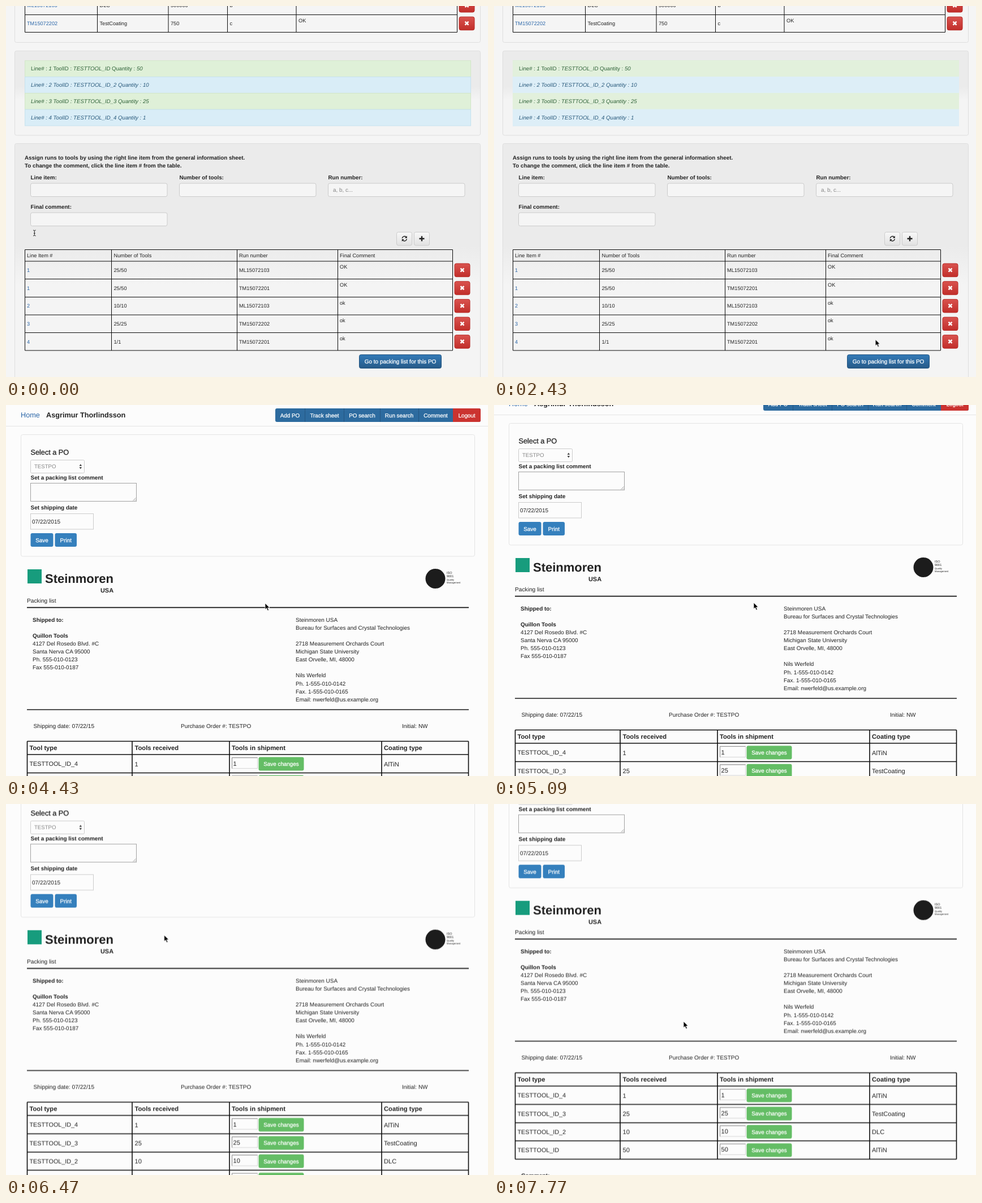
These frames come from a looping animation (852 by 657 pixels, 8 s). An HTML page:

```html
<!DOCTYPE html>
<html lang="en">
<head>
<meta charset="utf-8">
<title>Packing list</title>
<style>
html, body { margin: 0; height: 100%; overflow: hidden; background: #fcfcfc; }
svg { display: block; width: 100vw; height: 100vh; }
text { font-family: "Liberation Sans", Arial, sans-serif; fill: #222; white-space: pre; text-rendering: geometricPrecision; }
.b { font-weight: 700; }
.i { font-style: italic; }
.mid { text-anchor: middle; }
.heavy { stroke: #222; stroke-width: .3; }
.white { fill: #fff; stroke: #fff; stroke-width: .28; }
.link { fill: #2a66a8; }
.green { fill: #2f6238; }
.blue { fill: #27587a; }
.gray { fill: #858585; }

.show { animation: 8s step-end infinite; }
#beam { animation-name: beam; }
#arrow { animation-name: arrow; }
#hand, #hover { animation-name: hand; }
#press { animation-name: press; }
#pale { animation-name: pale; }
#runs { animation-name: runs; }
#packing { animation-name: packing; }
#scroll { animation: scroll 8s step-end infinite; }
#cursor { animation: move 8s linear infinite; }

@keyframes beam { 0% { opacity: 1 } .625%, 100% { opacity: 0 } }
@keyframes arrow { 0% { opacity: 0 } .625% { opacity: 1 } 33.6% { opacity: 0 } 47.5%, 100% { opacity: 1 } }
@keyframes hand { 0% { opacity: 0 } 33.6% { opacity: 1 } 47.5%, 100% { opacity: 0 } }
@keyframes press { 0% { opacity: 0 } 44.875%, 100% { opacity: 1 } }
@keyframes pale { 0% { opacity: 0 } 30.375%, 100% { opacity: 1 } }
@keyframes runs { 0% { opacity: 1 } 47.5%, 100% { opacity: 0 } }
@keyframes packing { 0% { opacity: 0 } 47.5%, 100% { opacity: 1 } }
@keyframes scroll {
  0% { transform: translateY(0) }
  59.125% { transform: translateY(-1px) }
  60.25% { transform: translateY(-3px) }
  61.375% { transform: translateY(-6px) }
  63.625% { transform: translateY(-20px) }
  65.125% { transform: translateY(-46px) }
  67.75% { transform: translateY(-67.5px) }
  86.875% { transform: translateY(-68.2px) }
  87.6% { transform: translateY(-69.2px) }
  88.25% { transform: translateY(-70.4px) }
  89% { transform: translateY(-73px) }
  91.625% { transform: translateY(-98px) }
  94.5%, 100% { transform: translateY(-119.5px) }
}
@keyframes move {
  0%, 2.6% { transform: translate(57px, 428px) }
  8% { transform: translate(190px, 500px) }
  13.25% { transform: translate(366px, 529px) }
  15.5% { transform: translate(452px, 544px) }
  18.75% { transform: translate(573px, 560px) }
  23.375% { transform: translate(668px, 578px) }
  25.625%, 29.7% { transform: translate(673px, 584px) }
  35.125%, 50.5% { transform: translate(682px, 636px) }
  51.9% { transform: translate(640px, 592px) }
  53.1% { transform: translate(585px, 552px) }
  54.4% { transform: translate(482px, 404px) }
  55.375%, 60% { transform: translate(458px, 351px) }
  62%, 70.7% { transform: translate(459px, 350px) }
  70.75%, 72.5% { transform: translate(456px, 348px) }
  81.625% { transform: translate(264px, 222px) }
  84.625% { transform: translate(257px, 211px) }
  91.625% { transform: translate(257px, 211px); animation-timing-function: step-end }
  94.5% { transform: translate(299px, 355px); animation-timing-function: step-end }
  97.125%, 100% { transform: translate(335px, 385px) }
}
</style>
</head>
<body>
<svg viewBox="0 0 852 657" preserveAspectRatio="none">
  <defs>
    <linearGradient id="well" x2="0" y2="1"><stop offset=".42" stop-color="#ebebeb"/><stop offset=".58" stop-color="#f4f4f4"/></linearGradient>
    <linearGradient id="red" x2="0" y2="1"><stop stop-color="#d9534f"/><stop offset="1" stop-color="#c12e2a"/></linearGradient>
    <linearGradient id="navy" x2="0" y2="1"><stop stop-color="#337ab7"/><stop offset="1" stop-color="#265a88"/></linearGradient>
    <linearGradient id="dim" x2="0" y2="1"><stop stop-color="#2d6a9f"/><stop offset=".55" stop-color="#265a88"/></linearGradient>
    <linearGradient id="plain" x2="0" y2="1"><stop stop-color="#f8f8f8"/><stop offset="1" stop-color="#e2e2e2"/></linearGradient>
  </defs>
  <g id="runs" class="show"></g>
  <g id="packing" class="show"><rect width="852" height="657" fill="#fcfcfc"/><g id="scroll"></g></g>
  <g id="beam" class="show"><path d="M48 397q2.3 0 2.3 1.5v7q0 1.5-2.3 1.5M52.600 397q-2.300 0-2.300 1.500M52.600 407q-2.300 0-2.300-1.500M49 402.500h2.600" fill="none" stroke="#222"/></g>
  <g id="cursor">
    <path id="arrow" class="show" d="M0 0v11.200l2.600-2.400 1.900 4.400 2-.9-1.900-4.200h3.500z" fill="#000" stroke="#fff" stroke-width=".8"/>
    <path id="hand" class="show" d="M-1 1.500q0-1.500 1.200-1.500t1.200 1.500v3q2-.8 2.400.6 1.700-.5 2 .8 1.700-.2 1.700 1.500v1.600q0 1.500-1.200 3.500h-6q-1-2-3.300-4.300-.9-1.600.6-1.700l1.400 1.200z" fill="#fff" stroke="#111" stroke-width=".9"/>
  </g>
</svg>
<script>
const SMALL = 9.2, BODY = 9.87, ADDRESS = 9.95, CELL = 11.1;

// Text is placed by the middle of its capitals.
const text = (x, y, s, size = BODY, cls = '') =>
  `<text x="${x}" y="${y + size * .36}" font-size="${size}" class="${cls}">${s}</text>`;
const box = (x, y, w, h, fill, stroke = 'none', r = 0) =>
  `<rect x="${x}" y="${y}" width="${w}" height="${h}" rx="${r}" fill="${fill}" stroke="${stroke}"/>`;
const path = (d, stroke = '#111', width = 1) =>
  `<path d="${d}" fill="none" stroke="${stroke}" stroke-width="${width}"/>`;
const grid = (xs, ys, width) => path(
  xs.map(x => `M${x} ${ys[0]}V${ys.at(-1)}`).join('') +
  ys.map(y => `M${xs[0]} ${y}H${xs.at(-1)}`).join(''), '#0c0c0c', width);
const button = (x, y, w, label, fill, stroke = 'none') =>
  box(x, y, w, 24, fill, stroke, 3) + text(x + w / 2, y + 12, label, BODY, 'white mid');
const remove = (x, y) => box(x + .5, y - 11.5, 27, 23.5, 'url(#red)', '#b92c28', 3) +
  path(`M${x + 11} ${y - 3}l6 6m0-6l-6 6`, '#fff', 2.5);
const lines = (x, rows) => rows.map(([y, s, cls]) => text(x, y, s, ADDRESS, cls)).join('');

function runsPage() {
  let out = box(0, 0, 852, 657, '#f5f5f5');

  out += box(15.5, -60, 823, 124.5, '#f5f5f5', '#dedede', 3);
  out += grid([33.5, 161.5, 287, 391.5, 513, 797.5], [-16, 15.5, 46.5], 1);
  [['ML15072103', 'DLC', '500000', 'b', ''], ['TM15072202', 'TestCoating', '750', 'c', 'OK']].forEach((row, r) => {
    const y = -1 + r * 31.7;
    row.forEach((s, c) => out += text([37, 165.5, 291, 395.5, 517][c], c == 4 ? y - 5.5 : y, s, SMALL, c ? '' : 'link'));
    out += remove(800.5, y);
  });

  out += box(15.5, 79.5, 823, 149.5, 'url(#well)', '#dedede', 3);
  const bands = (colors, borders) => [0, 1, 2, 3].map(n =>
    box(33.5, 96.800 + n * 28.8, 788, 28.8, colors[n % 2], borders[n % 2])).join('');
  out += bands(['#dff0d8', '#d9edf7'], ['#d2e6c8', '#c6e2ee']);
  out += `<g id="pale" class="show">${bands(['#e2f0dc', '#ddeef7'], ['#e2f0dc', '#ddeef7'])}</g>`;
  const it = s => `<tspan class="i">${s}</tspan>`;
  out += text(44, 111, `Line# : ${it(1)} ToolID : ${it('TESTTOOL_ID')} Quantity : ${it(50)}`, 9.65, 'green');
  [10, 25, 1].forEach((n, k) => out += text(44, 140 + k * 29,
    `Line# : ${k + 2} ToolID : TESTTOOL_ID_${k + 2} Quantity : ${n}`, 9.65, k == 1 ? 'i green' : 'i blue'));

  out += box(15.5, 243.5, 823, 432, 'url(#well)', '#dedede', 3);
  out += text(33, 268, 'Assign runs to tools by using the right line item from the general information sheet.', 9.8, 'b');
  out += text(33, 282, 'To change the comment, click the line item # from the table.', 9.8, 'b');
  [[43.5, 303, 'Line item:'], [306.5, 303, 'Number of tools:'], [569.5, 303, 'Run number:'], [43.5, 355, 'Final comment:']]
    .forEach(([x, y, s]) => out += text(x, y, s, 9.8, 'b') + box(x, y + 11, 241.5, 23.5, '#f5f5f5', '#cbcbcb', 3));
  out += text(578, 325.8, 'a, b, c...', BODY, 'gray');

  out += box(690.5, 400.5, 27, 23.5, 'url(#plain)', '#ccc', 3) + box(721.5, 400.5, 27, 23.5, 'url(#plain)', '#ccc', 3);
  out += path('M735 407.500v9m-4.500-4.500h9', '#222', 2.4);
  out += path('M700.300 411.500a4 4 0 0 1 6.800-2.500m1.200 3.500a4 4 0 0 1-6.800 2.500', '#222', 1.5);
  out += '<path d="M708.800 407v4h-4zM699.800 417v-4h4z" fill="#222"/>';

  const cols = [37, 190.5, 412, 590];
  out += grid([33.5, 186.5, 408.5, 586.5, 789.5], [431.5, 452, 483.5, 515.5, 547, 578.5, 610], 1);
  ['Line Item #', 'Number of Tools', 'Run number', 'Final Comment'].forEach((s, c) => out += text(cols[c], 441.3, s, SMALL));
  [[1, '25/50', 'ML15072103', 'OK'], [1, '25/50', 'TM15072201', 'OK'], [2, '10/10', 'ML15072103', 'ok'],
   [3, '25/25', 'TM15072202', 'ok'], [4, '1/1', 'TM15072201', 'ok']].forEach((row, r) => {
    const y = 467.6 + r * 31.65;
    row.forEach((s, c) => out += text(cols[c], c == 3 ? y - 5.5 : y, s, SMALL, c ? '' : 'link'));
    out += remove(792.5, y);
  });

  const go = fill => box(624.5, 617.5, 145, 24, fill, '#245580', 3);
  out += go('url(#navy)') + `<g id="hover" class="show">${go('url(#dim)')}</g><g id="press" class="show">${go('#27608f')}</g>`;
  return out + text(697, 629.7, 'Go to packing list for this PO', 10, 'white mid');
}

function packingPage() {
  let out = text(26, 17.5, 'Home', 12.7, 'link') + text(71, 17.5, 'Asgrimur Thorlindsson', 12.7, 'b');
  out += path('M0 37.500H852', '#e4e4e4');
  out += box(476, 6, 363, 24, '#2d6b9f', 'none', 3) + '<path d="M790 6h46q3 0 3 3v18q0 3-3 3h-46z" fill="#cb3330"/>';
  out += path('M528.500 6v24M597.500 6v24M661.500 6v24M729.500 6v24', '#245682');
  [[502, 'Add PO'], [563, 'Track sheet'], [629.5, 'PO search'], [695, 'Run search'], [759.5, 'Comment'], [814.5, 'Logout']]
    .forEach(([x, s]) => out += text(x, 18.3, s, BODY, 'white mid'));

  out += box(26.5, 52.5, 802, 215.5, '#fcfcfc', '#e4e4e4', 3);
  out += text(43.5, 83.5, 'Select a PO', 12.7, 'heavy');
  out += box(43.5, 97.5, 95, 23, '#fcfcfc', '#ccc', 2) + text(50, 109, 'TESTPO', 9.6, 'gray');
  out += '<path d="M129.500 108l2.300-3.500 2.300 3.500zM129.500 110l2.300 3.500 2.300-3.500z" fill="#444"/>';
  out += text(43.5, 128, 'Set a packing list comment', ADDRESS, 'b');
  out += box(43.5, 138.5, 187, 32, '#fcfcfc', '#a2a2a2') + path('M224.500 169.500l5-5m-2 5l2-2', '#888', .8);
  out += text(43.5, 181.5, 'Set shipping date', ADDRESS, 'b');
  out += box(43.5, 192.5, 111, 27.5, '#fcfcfc', '#ccc') + text(46, 206.2, '07/22/2015', 10);
  out += button(43.5, 227, 40, 'Save', '#3580bd') + button(86.5, 227, 38.5, 'Print', '#3580bd');

  out += box(38, 291, 25, 25, '#179c7d') + text(69, 307.3, 'Steinmoren', 22, 'b') + text(167, 328.2, 'USA', 10.9, 'b');
  out += '<circle cx="759" cy="307.500" r="17.500" fill="#1c1c1c"/>';
  [[297, 'ISO', 5.5], [303.3, '9001', 5.5], [309, 'Quality', 4.2], [314, 'Management', 4.2]]
    .forEach(([y, s, size]) => out += text(779, y, s, size));
  out += text(37, 346, 'Packing list', 10.2) + path('M37 358.600H818M37 539.500H818', '#111', 1.6);

  out += lines(47, [[380.5, 'Shipped to:', 'b'], [408.7, 'Quillon Tools', 'b'], [422.7, '4127 Del Rosedo Blvd. #C'],
    [436.7, 'Santa Nerva CA 95000'], [450.7, 'Ph. 555-010-0123'], [464.7, 'Fax 555-010-0187']]);
  out += lines(512, [[380.5, 'Steinmoren USA'], [394.6, 'Bureau for Surfaces and Crystal Technologies'],
    [422.7, '2718 Measurement Orchards Court'], [436.7, 'Michigan State University'], [450.7, 'East Orvelle, MI, 48000'],
    [478.9, 'Nils Werfeld'], [493, 'Ph. 1-555-010-0142'], [507, 'Fax. 1-555-010-0165'], [521, 'Email: nwerfeld@us.example.org']]);
  out += text(48.5, 568.2, 'Shipping date: 07/22/15', 10.2) + text(309, 568.2, 'Purchase Order #: TESTPO', 10) + text(700, 568.2, 'Initial: NW', 10);

  const cols = [41.5, 227.5, 399, 668];
  out += grid([37.5, 223, 395, 664, 817.5], [595.5, 619, 651.5, 684, 716, 748.5], 1.6);
  ['Tool type', 'Tools received', 'Tools in shipment', 'Coating type'].forEach((s, c) => out += text(cols[c], 607.3, s, 11.2, 'b'));
  [['TESTTOOL_ID_4', 1, 'AlTiN'], ['TESTTOOL_ID_3', 25, 'TestCoating'], ['TESTTOOL_ID_2', 10, 'DLC'], ['TESTTOOL_ID', 50, 'AlTiN']]
    .forEach(([tool, count, coating], r) => {
      const y = 635.6 + r * 32.3;
      out += text(cols[0], y, tool, 10.8) + text(cols[1], y, count, CELL) + text(cols[3], y, coating, CELL);
      out += box(399.5, y - 11, 45, 19, '#fcfcfc', '#d5d5d5') + path(`M399.500 ${y + 8}v-19h45`, '#8a8a8a');
      out += text(401.5, y - 1, count, CELL) + button(446.5, y - 12.1, 80, 'Save changes', '#64bd65');
    });
  return out + text(48, 777, 'Comment:', 10.2, 'b');
}

document.getElementById('runs').innerHTML = runsPage();
document.getElementById('scroll').innerHTML = packingPage();
</script>
</body>
</html>
```
